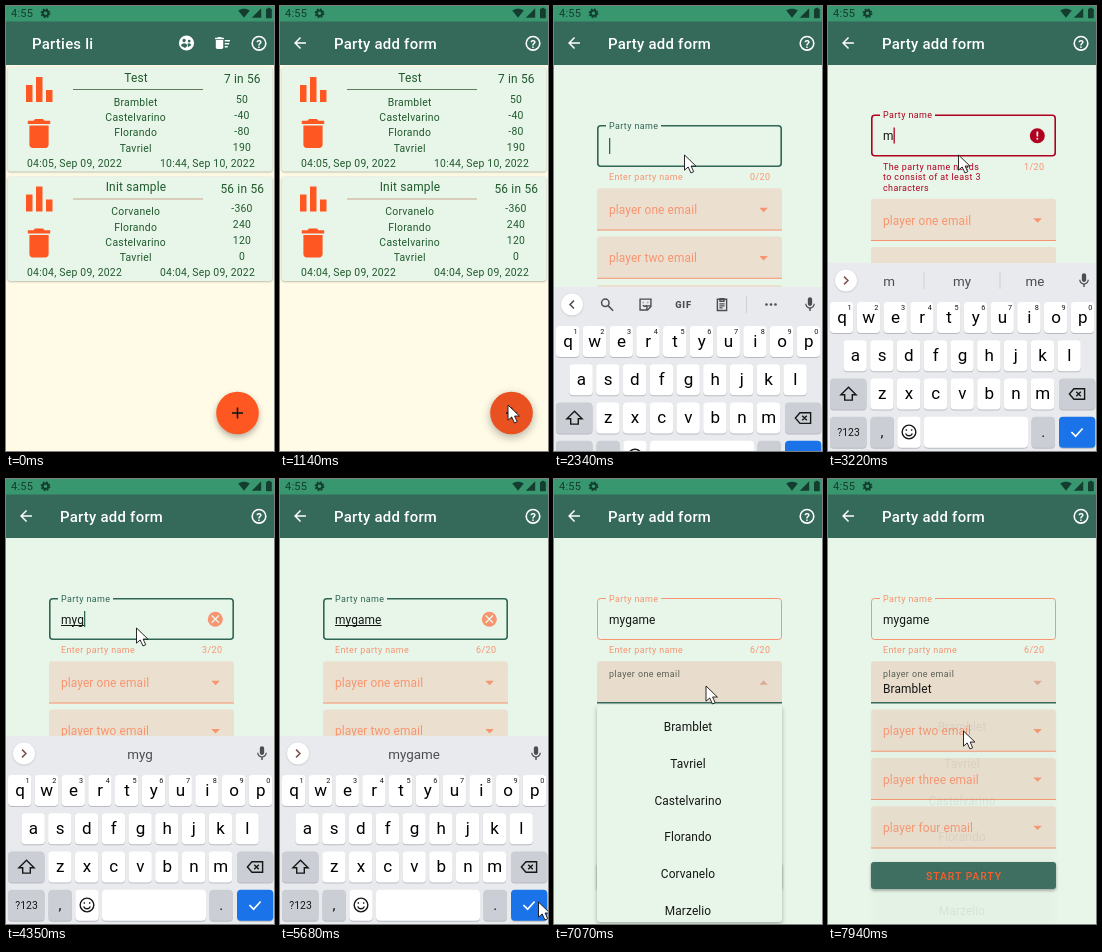
Write an HTML page with a canvas that moves like this. It is 268 px wide and 445 px high and loops after 8000 ms.

```html
<!DOCTYPE html>
<html lang="en">
<head>
<meta charset="utf-8">
<title>Party add form</title>
<style>
html, body { margin: 0; width: 268px; height: 445px; overflow: hidden; }
canvas { display: block; }
</style>
</head>
<body>
<canvas id="stage" width="268" height="445"></canvas>
<script>
const ctx = document.getElementById('stage').getContext('2d');
const LOOP = 8000;
const GREEN = '#35695a', MINT = '#e8f5e9', CREAM = '#fffbe6', ORANGE = '#ff5722';
const PEACH = '#f8946f', RED = '#b00020', LEAF = '#1f5a2c', GREY = '#4a4d51', INK = '#151715';

const ICONS = {
  back: 'M20 11H7.8l5.6-5.6L12 4l-8 8 8 8 1.4-1.4L7.8 13H20z',
  bin: 'M6 19c0 1.1.9 2 2 2h8c1.1 0 2-.9 2-2V7H6zM19 4h-3.5l-1-1h-5l-1 1H5v2h14z',
  sweep: 'M15 16h4v2h-4zm0-8h7v2h-7zm0 4h6v2h-6zM3 18c0 1.1.9 2 2 2h6c1.1 0 2-.9 2-2V8H3zM14 5h-3l-1-1H6L5 5H2v2h12z',
  people: 'M6 9a2.5 2.5 0 1 0 5 0a2.5 2.5 0 1 0-5 0M14 10a2 2 0 1 0 4 0a2 2 0 1 0-4 0M4 17c0-5 9-5 9 0l-3 3zM14 19c0-3 0-4-1-5 3-1 6 0 6 2z',
  wifi: 'M12 22L24 7C20 4 16 3 12 3S4 4 0 7z',
  signal: 'M2 22h20V2z',
  mic: 'M12 14c1.7 0 3-1.3 3-3V5c0-1.7-1.3-3-3-3S9 3.3 9 5v6c0 1.7 1.3 3 3 3zM17 11c0 2.8-2.2 5-5 5s-5-2.2-5-5H5.3c0 3.4 2.7 6.2 5.7 6.7V21h2v-3.3c3-.5 5.7-3.3 5.7-6.7z',
  search: 'M4 9.5a5.5 5.5 0 1 0 11 0a5.5 5.5 0 1 0-11 0M14 14l7 7',
  sticker: 'M4 4h16v11l-5 5H4zM20 14h-6v6M8 9h1M15 9h1M8 13c2 2 4 2 6 0',
  clipboard: 'M5 4h14v17H5zM9 3h6v4H9zM8 11h8M8 14h8M8 17h5',
  shift: 'M12 3L2 13h5v7h10v-7h5z',
  erase: 'M8 5h14v14H8L2 12zM11 9l6 6m0-6l-6 6',
  check: 'M4 12l6 6L20 7',
  smile: 'M3 12a9 9 0 1 0 18 0a9 9 0 1 0-18 0M8.5 8.5v2M15.5 8.5v2M7.5 14c2 4 7 4 9 0',
  left: 'M15 6l-6 6 6 6', right: 'M9 6l6 6-6 6',
  cross: 'M6 6l12 12M18 6L6 18',
  cursor: 'M0 0V16.5L4 13L7 19.5L10 18.2L7.2 12H12.4z'
};

const clamp = v => Math.max(0, Math.min(1, v));
const ramp = (t, a, b) => clamp((t - a) / (b - a));
const smooth = p => p * p * (3 - 2 * p);
const easeOut = p => 1 - (1 - p) ** 3;
const mix = (a, b, p) => a + (b - a) * p;

function text(s, x, y, size, color, { align = 'left', weight = 400, gap = 0.2 } = {}) {
  ctx.font = `${weight} ${size}px Roboto, sans-serif`;
  ctx.letterSpacing = gap + 'px';
  ctx.textAlign = align;
  ctx.fillStyle = color;
  ctx.fillText(s, x, y + size * 0.355);
}
const centred = (s, x, y, size, color, gap) => text(s, x, y, size, color, { align: 'center', gap });
const caption = (s, x, y, color) => text(s, x, y, 8.93, color, { gap: 0.4 });

function box(x, y, w, h, color, r = 0) {
  ctx.fillStyle = color;
  ctx.beginPath();
  ctx.roundRect(x, y, w, h, r);
  ctx.fill();
}
function disc(x, y, r, color) {
  ctx.fillStyle = color;
  ctx.beginPath();
  ctx.arc(x, y, r, 0, 7);
  ctx.fill();
}
function ring(x, y, r, color, width, dash = []) {
  ctx.strokeStyle = color;
  ctx.lineWidth = width;
  ctx.setLineDash(dash);
  ctx.beginPath();
  ctx.arc(x, y, r, 0, Math.PI * 2);
  ctx.stroke();
  ctx.setLineDash([]);
}
// Icons live on a 24 unit grid centred on (x, y); a line width means outline only.
function icon(name, x, y, scale, color, line) {
  ctx.save();
  ctx.translate(x - 12 * scale, y - 12 * scale);
  ctx.scale(scale, scale);
  const path = new Path2D(ICONS[name]);
  ctx.fillStyle = ctx.strokeStyle = color;
  if (line) {
    ctx.lineWidth = line / scale;
    ctx.stroke(path);
  } else ctx.fill(path);
  ctx.restore();
}
function withShadow(blur, dy, alpha, draw) {
  ctx.save();
  ctx.shadowColor = `rgba(0,0,0,${alpha})`;
  ctx.shadowBlur = blur;
  ctx.shadowOffsetY = dy;
  draw();
  ctx.restore();
}
function faded(alpha, draw) {
  if (alpha <= 0) return;
  ctx.save();
  ctx.globalAlpha *= alpha;
  draw();
  ctx.restore();
}

function header(onForm) {
  box(0, 0, 268, 59, GREEN);
  box(0, 0, 268, 15.5, '#38976f');
  const dark = '#143d2f';
  text('4:55', 5, 7.5, 11, dark);
  ring(39.5, 7.3, 2.8, dark, 2);
  ring(39.5, 7.3, 4.3, dark, 1.2, [1.8, 1.58]);
  icon('wifi', 238, 7, 0.48, dark);
  icon('signal', 250.5, 7, 0.47, dark);
  box(260, 2.8, 5.8, 9.4, dark, 0.6);
  box(261.5, 1.8, 2.8, 1.2, dark);

  const title = { weight: 500, gap: 0.25 };
  if (onForm) {
    icon('back', 20, 37, 0.744, '#fff');
    text('Party add form', 54, 37.8, 14.9, '#fff', title);
  } else {
    text('Parties li', 26, 37.8, 14.9, '#fff', title);
    disc(180.5, 37, 7.6, '#fff');
    icon('people', 180.5, 36.5, 0.68, GREEN);
    icon('sweep', 216.5, 37, 0.744, '#fff');
  }
  ring(253, 37.3, 6.8, '#fff', 1.6);
  text('?', 253, 37.5, 11.5, '#fff', { align: 'center', weight: 700, gap: 0 });
}

function card(y, title, count, line, rows, dates) {
  withShadow(2, 0.7, 0.3, () => box(1.5, y + 61, 265, 104.5, MINT, 3));
  [[20, 79], [30, 71], [40, 84]].forEach(([x, top]) => box(x, y + top, 6.5, 96 - top, ORANGE));
  icon('bin', 33, y + 127.5, 1.6, ORANGE);
  centred(title, 130, y + 71.5, 11.9, LEAF);
  centred(count, 236.3, y + 73, 11.9, LEAF);
  box(67, y + 83, 130, 1, line);
  rows.forEach(([name, score], i) => {
    centred(name, 129.7, y + 96 + 15.4 * i, 10.4, LEAF, 0.26);
    centred(score, 236, y + 93.3 + 15.9 * i, 10.4, LEAF, 0.26);
  });
  text(dates[0], 21, y + 157, 10.4, LEAF, { gap: 0.25 });
  text(dates[1], 154, y + 157, 10.4, LEAF, { gap: 0.25 });
}

function listPage(t) {
  box(0, 59, 268, 386, CREAM);
  card(0, 'Test', '7 in 56', '#5f7a58',
    [['Bramblet', '50'], ['Castelvarino', '-40'], ['Florando', '-80'], ['Tavriel', '190']],
    ['04:05, Sep 09, 2022', '10:44, Sep 10, 2022']);
  card(109.5, 'Init sample', '56 in 56', '#c9a58c',
    [['Corvanelo', '-360'], ['Florando', '240'], ['Castelvarino', '120'], ['Tavriel', '0']],
    ['04:04, Sep 09, 2022', '04:04, Sep 09, 2022']);
  const press = ramp(t, 950, 1140);
  withShadow(6 + 4 * press, 3, 0.3, () => disc(231.5, 407, 21.3, ORANGE));
  disc(231.5, 407, 21.3, `rgba(90,50,20,${0.13 * press})`);
  box(226, 406.2, 11, 1.6, INK);
  box(230.7, 401.5, 1.6, 11, INK);
}

const NAME = 'mygame';
const KEY_TIMES = [2940, 3560, 4020, 4550, 4750, 4950];
const FOCUS = 2040, SWITCH = 6780, PICK = 7740;
const typedAt = t => KEY_TIMES.filter(k => t >= k).length;

function nameField(t, typed, error, y) {
  const focused = t >= FOCUS && t < SWITCH;
  const color = error ? RED : focused ? '#2f6654' : PEACH;
  const line = focused ? 1.6 : 1;
  const up = t < FOCUS ? 0 : easeOut(ramp(t, FOCUS, 2210));
  ctx.strokeStyle = color;
  ctx.lineWidth = line;
  ctx.beginPath();
  ctx.roundRect(43 + line / 2, y + 119 + line / 2, 185 - line, 42 - line, 3);
  ctx.stroke();
  if (up) box(52, y + 117, 55 * up, 5, MINT);
  text('Party name', 55, y + mix(140, 119.8, up), mix(11.9, 8.93, up), color, { gap: mix(0.11, 0.4, up) });

  const value = NAME.slice(0, typed);
  text(value, 55, y + 140.7, 11.9, INK, { gap: 0.11 });
  const width = typed ? ctx.measureText(value).width : 0;
  if (typed > 2 && t < 6010) box(55, y + 146, width, 1, INK);
  const lastInput = typed ? KEY_TIMES[typed - 1] : FOCUS;
  if (focused && (t - lastInput) % 1000 < 500) box(55 + width, y + 132, 1.3, 16, color);

  if (error) {
    disc(209.3, y + 140.2, 7.5, RED);
    box(208.5, y + 136, 1.7, 5, MINT);
    box(208.5, y + 142.4, 1.7, 1.7, MINT);
  } else if (typed) {
    faded(focused ? ramp(t, KEY_TIMES[2], 4170) : 1 - ramp(t, SWITCH, 6880), () => {
      disc(209.3, y + 140.2, 7.5, PEACH);
      icon('cross', 209.3, y + 140.2, 0.6, MINT, 1.4);
    });
  }
  if (error) {
    faded(ramp(t, 2920, 3110), () =>
      ['The party name needs', 'to consist of at least 3', 'characters']
        .forEach((s, i) => caption(s, 55, y + 171.2 + i * 10.5, RED)));
  } else {
    faded(typed ? ramp(t, KEY_TIMES[2] - 20, 4190) : 1, () => caption('Enter party name', 55, y + 171, PEACH));
  }
  caption(typed + '/20', 196, y + 171, PEACH);
}

function playerField(t, label, y, first) {
  const active = first && t >= SWITCH;
  box(43, y, 185, 42, active ? '#e8dccd' : '#ebe0d0', [3, 3, 0, 0]);
  const up = active ? easeOut(ramp(t, SWITCH, 6950)) : 0;
  box(43, y + (active ? 40.6 : 41.2), 185, active ? 1.6 : 1, active ? GREEN : PEACH);
  text(label, 55, y + mix(21.5, 13, up), mix(11.9, 8.93, up), active ? '#5a5f55' : PEACH, { gap: mix(0.11, 0.4, up) });
  if (active && t >= PICK) text('Bramblet', 55, y + 27.5, 11.9, INK, { gap: 0.11 });
  const flip = active && t < PICK ? -1 : 1;
  ctx.fillStyle = active ? '#d9ab93' : PEACH;
  ctx.beginPath();
  ctx.moveTo(205.3, y + 21.5 - 2 * flip);
  ctx.lineTo(213.9, y + 21.5 - 2 * flip);
  ctx.lineTo(209.6, y + 21.5 + 2.4 * flip);
  ctx.fill();
}

function formPage(t) {
  const typed = typedAt(t);
  const error = typed === 1 || typed === 2;
  const shift = error ? 10.5 : 0;
  box(0, 59, 268, 386, MINT);
  nameField(t, typed, error, -shift);
  ['one', 'two', 'three', 'four'].forEach((n, i) =>
    playerField(t, `player ${n} email`, 182.3 + 48.3 * i + shift, i === 0));
  withShadow(3, 1.5, 0.35, () => box(43, 383 + shift, 185, 27, GREEN, 3));
  text('START PARTY', 136, 397 + shift, 10.4, ORANGE, { align: 'center', weight: 500, gap: 0.93 });
}

function menu(t) {
  const open = ramp(t, 6850, 7000);
  faded(open * (1 - ramp(t, PICK, 7954)), () => {
    withShadow(4, 2, 0.3, () => box(43, 226, 185, 217 * mix(0.6, 1, easeOut(open)), MINT, 3));
    ['Bramblet', 'Tavriel', 'Castelvarino', 'Florando', 'Corvanelo', 'Marzelio']
      .forEach((name, i) => centred(name, 134, 248 + 36.7 * i, 11.9, INK, 0.11));
  });
}

function key(x, y, w, color = '#fff') {
  box(x, y + 1, w, 31, '#b8bbc1', 4);
  box(x, y, w, 31, color, 4);
}

function toolbar(typed) {
  withShadow(2, 0.5, 0.2, () => disc(18, 274.5, 11, '#fff'));
  icon(typed ? 'right' : 'left', 18, 274.5, 0.65, typed ? '#7d4f48' : GREY, 1.5);
  icon('mic', 256, 274.5, 0.72, GREY);
  if (!typed) {
    icon('search', 53, 274.5, 0.68, GREY, 1.5);
    icon('sticker', 91.5, 274.5, 0.68, GREY, 1.4);
    text('GIF', 129.5, 274.5, 9.3, GREY, { align: 'center', weight: 800, gap: 0.8 });
    icon('clipboard', 168, 274.5, 0.66, GREY, 1.4);
    box(192, 266, 1, 17, '#cdd0d4');
    [212.5, 217, 221.5].forEach(x => disc(x, 274.5, 1.3, GREY));
    return;
  }
  const words = typed === 1 ? ['m', 'my', 'me'] : typed === 2 ? ['myself', 'my', 'mystery'] : ['', NAME.slice(0, typed), ''];
  words.forEach((w, i) => centred(w, 61 + 73 * i, 275, 13.4, GREY, 0));
  if (typed < 3) [95.5, 171.5].forEach(x => box(x, 266, 1, 17, '#cdd0d4'));
}

function keyboard(t, typed) {
  const lift = t < 6010 ? easeOut(ramp(t, 2145, 2540)) : 1 - smooth(ramp(t, 5990, 6300));
  if (!lift) return;
  const SIDE = '#cbced5', BLACK = '#000';
  ctx.save();
  ctx.translate(0, 188 * (1 - lift));
  box(0, 257, 268, 188, '#e8eaed');
  toolbar(typed);
  [['qwertyuiop', 2], ['asdfghjkl', 15.4], ['zxcvbnm', 42.2]].forEach(([row, left], r) => {
    [...row].forEach((c, i) => {
      const x = left + 26.75 * i, y = 296 + 38.2 * r;
      key(x, y, 23.4);
      centred(c, x + 12, y + 14.8, 17, BLACK, 0);
      if (!r) centred((i + 1) % 10, x + 19.6, y + 5.3, 7.3, INK, 0);
    });
  });
  key(2, 372.4, 36.5, SIDE);
  icon('shift', 20.5, 388, 0.76, INK, 1.4);
  key(231, 372.4, 36.3, SIDE);
  icon('erase', 249, 388, 0.76, INK, 1.4);
  key(2, 410.7, 36.5, SIDE);
  centred('?123', 20.5, 426.5, 10.4, INK, 0);
  key(42.5, 410.7, 23.4, SIDE);
  centred(',', 54, 426, 15, INK, 0);
  key(69.3, 410.7, 23.4);
  icon('smile', 81, 426, 0.76, INK, 1.4);
  key(96, 410.7, 104);
  key(203.5, 410.7, 23.4, SIDE);
  centred('.', 215.2, 426, 15, INK, 0);
  key(231, 410.7, 36.3, t > 5810 && t < 6010 ? '#1765c8' : '#1a73e8');
  icon('check', 249, 426, 0.7, '#fff', 1.7);
  ctx.restore();
}

// Each stop: start time, end time, x, y of the pointer tip.
const MOVES = [
  [400, 800, 228, 399], [1250, 1870, 130.5, 149], [5150, 5670, 258.5, 423],
  [6080, 6500, 152, 207], [7200, 7660, 135.5, 252]
];
function pointer(t) {
  if (t < 400) return;
  let x = 231, y = 445;
  for (const [a, b, toX, toY] of MOVES) {
    const p = smooth(ramp(t, a, b));
    x = mix(x, toX, p);
    y = mix(y, toY, p);
  }
  const scale = 0.92;
  icon('cursor', x + 12 * scale, y + 12 * scale, scale, '#fff');
  icon('cursor', x + 12 * scale, y + 12 * scale, scale, '#111', 0.9);
}

function draw(t) {
  const fade = ramp(t, 1190, 1430);
  if (fade < 1) listPage(t);
  faded(fade, () => formPage(t));
  menu(t);
  keyboard(t, typedAt(t));
  header(t >= 1100);
  pointer(t);
}

const start = performance.now();
(function frame() {
  draw((performance.now() - start) % LOOP);
  requestAnimationFrame(frame);
})();
</script>
</body>
</html>
```
